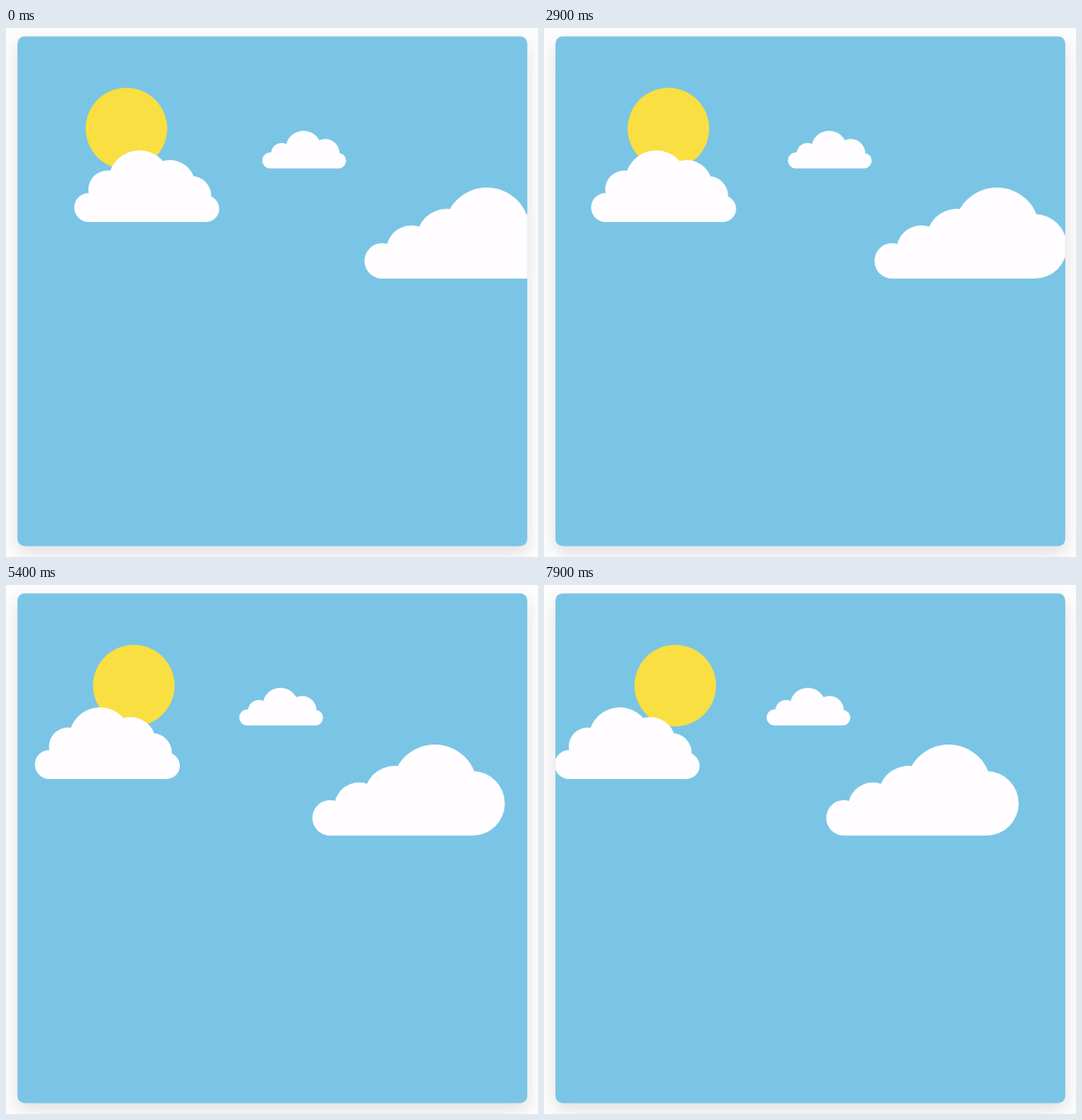
Write an HTML page with a canvas that moves like this. It is 600x597 px and loops after 8 s.

```html
<!DOCTYPE html>
<html lang="en">
<head>
<meta charset="utf-8">
<title>Drifting clouds</title>
<style>
  html, body { margin: 0; width: 100%; height: 100%; overflow: hidden; background: #fefdfe; }
  canvas { display: block; }
</style>
</head>
<body>
<canvas id="stage" width="600" height="597"></canvas>
<script>
const ctx = document.getElementById('stage').getContext('2d');
const LOOP = 8000, STEP = 100;

// Speeds are in pixels per second. Each cloud is a row of puffs given by
// centre x and radius; the end puffs rest on the base line.
const sun = { x: 135.8, y: 113.5, r: 46, speed: 1.55 };
const clouds = [
  makeCloud({ speed: -8.23, base: 219, peak: 46, bend: 2.5,
    xs: [93.4, 114.5, 150.5, 185, 209, 225.5], radii: [16.4, 21.6, 35, 28.4, 22.6, 15] }),
  makeCloud({ speed: -4.81, base: 158.6, peak: 22.6, bend: 2,
    xs: [298.2, 311, 335.5, 360, 374.8], radii: [9.2, 12, 20, 16.2, 8.8] }),
  makeCloud({ speed: -10.89, base: 282.8, peak: 54.8, bend: 1.3,
    xs: [424.3, 457, 497, 542.4, 585], radii: [20, 28, 34, 48, 36.4] })
];

// Puff centres climb from either end to the largest puff along an ease-out curve.
function makeCloud({ speed, base, peak, bend, xs, radii }) {
  const top = radii.indexOf(Math.max(...radii));
  const puffs = xs.map((x, i) => {
    const end = i <= top ? 0 : xs.length - 1;
    const t = (x - xs[end]) / (xs[top] - xs[end]);
    const rise = 1 - (1 - t) ** bend;
    return { x, y: base - radii[end] - (peak - radii[end]) * rise, r: radii[i] };
  });
  return { speed, base, puffs };
}

function disc({ x, y, r }) {
  ctx.moveTo(x + r, y);
  ctx.arc(x, y, r, 0, Math.PI * 2);
}

function drawSun(sec) {
  ctx.fillStyle = '#f9df41';
  ctx.beginPath();
  disc({ ...sun, x: sun.x + sun.speed * sec });
  ctx.fill();
}

function drawCloud({ speed, base, puffs }, sec) {
  ctx.save();
  ctx.translate(speed * sec, 0);
  ctx.fillStyle = '#fffdff';
  ctx.beginPath();
  puffs.forEach(disc);
  // Solid body between the puff centres and the flat base
  ctx.moveTo(puffs[0].x, base);
  for (const { x, y } of puffs) ctx.lineTo(x, y);
  ctx.lineTo(puffs.at(-1).x, base);
  ctx.closePath();
  ctx.fill();
  ctx.restore();
}

function card() {
  ctx.beginPath();
  ctx.roundRect(12.9, 9.4, 575, 575.3, 8);
}

function draw(ms) {
  const sec = Math.floor((ms % LOOP) / STEP) * STEP / 1000;
  ctx.fillStyle = '#fefdfe';
  ctx.fillRect(0, 0, 600, 597);

  ctx.save();
  ctx.shadowColor = 'rgba(0, 0, 0, 0.12)';
  ctx.shadowBlur = 20;
  ctx.shadowOffsetY = 8;
  ctx.fillStyle = '#7ac5e5';
  card();
  ctx.fill();
  ctx.restore();

  ctx.save();
  card();
  ctx.clip();
  drawSun(sec);
  for (const cloud of clouds) drawCloud(cloud, sec);
  ctx.restore();
}

let start;
function tick(now) {
  start ??= now;
  draw(now - start);
  requestAnimationFrame(tick);
}
draw(0);
requestAnimationFrame(tick);
</script>
</body>
</html>
```
